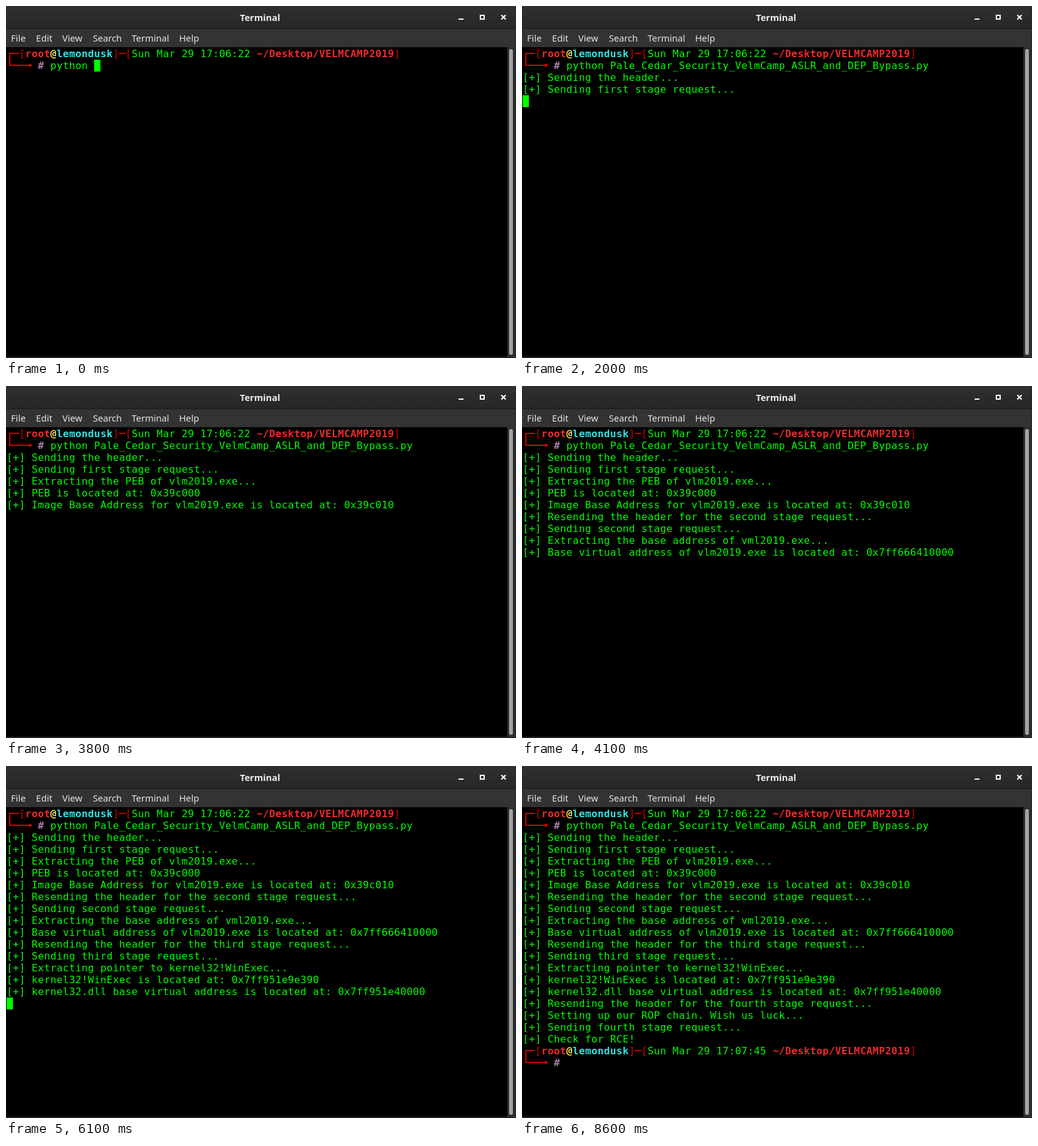
These frames come from a looping animation (816x564 px, 9 s). An HTML page:

```html
<!DOCTYPE html>
<html lang="en">
<head>
<meta charset="utf-8">
<title>Terminal</title>
<style>
  html, body { margin: 0; width: 100%; height: 100%; overflow: hidden; background: #000; }
  #stage { position: relative; width: 816px; height: 564px; overflow: hidden; background: #000; }
  #chrome { position: absolute; left: 0; top: 0; }
  #chrome text { font: 14.67px "Noto Sans", "Open Sans", sans-serif; fill: #e6e6e6; }
  #chrome .title { font-weight: bold; text-anchor: middle; fill: #eee; }
  #screen {
    position: absolute; left: 1px; top: 67px; width: 800px; height: 494px;
    font: 16px/19px "DejaVu Sans Mono", monospace;
    letter-spacing: calc(10px - 1ch); /* 10px character cells */
    font-variant-ligatures: none;
    white-space: pre; color: #0f0;
  }
  #screen > div { height: 19px; }
  #screen .prompt { position: relative; height: 38px; }
  .prompt svg { position: absolute; left: 0; top: 0; }
  .prompt b { font-weight: bold; }
  .red { color: #c00; }
  .user { color: #ef2929; }
  .at { color: #fce94f; }
  .host { color: #34e2e2; }
  .hash { color: #ad7fa8; }
  #cursor { position: absolute; width: 10px; background: #0f0; }
</style>
</head>
<body>
<div id="stage">
  <svg id="chrome" width="816" height="564" viewBox="0 0 816 564">
    <defs>
      <linearGradient id="bar" x2="0" y2="1">
        <stop offset="0" stop-color="#303030"/>
        <stop offset="1" stop-color="#262626"/>
      </linearGradient>
    </defs>
    <rect width="815" height="37" fill="url(#bar)"/>
    <rect y="36" width="815" height="1" fill="#1a1a1a"/>
    <rect y="37" width="815" height="29" fill="#333"/>
    <rect x="802" y="66" width="13" height="496" fill="#2e2e2e"/>
    <rect x="805" y="69" width="6" height="490" rx="3" fill="#a4a4a4"/>
    <rect x="815" width="1" height="564" fill="#20242c"/>
    <rect y="562" width="816" height="1" fill="#2b2b2b"/>
    <rect y="563" width="816" height="1" fill="#1c1522"/>
    <text class="title" x="406.5" y="24">Terminal</text>
    <text x="8" y="57">File</text>
    <text x="48" y="57">Edit</text>
    <text x="90" y="57">View</text>
    <text x="139" y="57">Search</text>
    <text x="201" y="57">Terminal</text>
    <text x="277" y="57">Help</text>
    <g fill="none" stroke="#fff" stroke-width="2">
      <path d="M724 21h8"/>
      <rect x="759" y="15" width="6" height="6"/>
      <path d="M792.5 14.5l7 7m0-7l-7 7" stroke-width="2.2"/>
    </g>
  </svg>
  <div id="screen"></div>
</div>
<script>
const LOOP = 9000, CELL = 10, ROW = 19;
const SCRIPT = "Pale_Cedar_Security_VelmCamp_ASLR_and_DEP_Bypass.py ";
const LOG = [
  "Sending the header...",
  "Sending first stage request...",
  "Extracting the PEB of vlm2019.exe...",
  "PEB is located at: 0x39c000",
  "Image Base Address for vlm2019.exe is located at: 0x39c010",
  "Resending the header for the second stage request...",
  "Sending second stage request...",
  "Extracting the base address of vml2019.exe...",
  "Base virtual address of vlm2019.exe is located at: 0x7ff666410000",
  "Resending the header for the third stage request...",
  "Sending third stage request...",
  "Extracting pointer to kernel32!WinExec...",
  "kernel32!WinExec is located at: 0x7ff951e9e390",
  "kernel32.dll base virtual address is located at: 0x7ff951e40000",
  "Resending the header for the fourth stage request...",
  "Setting up our ROP chain. Wish us luck...",
  "Sending fourth stage request...",
  "Check for RCE!"
];

// [start ms, value] steps
const TYPED = [[0, 0], [100, 1], [400, 2], [700, 4], [1200, SCRIPT.length]];
const LINES = [[0, 0], [2000, 2], [2500, 5], [4100, 9], [6100, 14], [8100, LOG.length]];
const BLINK = [[0, 1], [1700, 0], [2000, 1], [2600, 0], [3200, 1], [3800, 0], [4400, 1],
  [5000, 0], [5600, 1], [6200, 0], [6800, 1], [7400, 0], [8000, 1], [8600, 0]];

const at = (steps, t) => steps.reduce((v, [start, next]) => t >= start ? next : v, 0);

const prompt = (time, command) => `<div class="prompt">` +
  `<svg width="200" height="38" fill="none" stroke="#c00" stroke-width="2">` +
  `<path d="M20 9H5V28H40M180 9h10"/><path d="M35 28h5" stroke-width="4"/></svg>` +
  `<span class="red">  [</span><b class="user">root</b><b class="at">@</b>` +
  `<b class="host">lemondusk</b><span class="red">] [</span>Sun Mar 29 ${time} ` +
  `<b class="user">~/Desktop/VELMCAMP2019</b><span class="red">]</span>\n` +
  `     <b class="hash">#</b> ${command}</div>`;

const screen = document.getElementById("screen");
screen.innerHTML = prompt("17:06:22", `python <span id="typed"></span>`) +
  LOG.map(line => `<div class="log">[+] ${line}</div>`).join("") +
  prompt("17:07:45", "") + `<i id="cursor" style="height:${ROW}px"></i>`;

const typed = document.getElementById("typed");
const cursor = document.getElementById("cursor");
const logs = [...screen.querySelectorAll(".log")];
const lastPrompt = screen.querySelectorAll(".prompt")[1];
const show = (el, on) => { el.style.visibility = on ? "visible" : "hidden"; };

function draw(t) {
  const chars = at(TYPED, t), lines = at(LINES, t), done = lines === LOG.length;
  typed.textContent = SCRIPT.slice(0, chars);
  logs.forEach((el, i) => show(el, i < lines));
  show(lastPrompt, done);
  const row = done ? lines + 3 : lines ? lines + 2 : 1;
  const col = done ? 7 : lines ? 0 : 14 + chars;
  cursor.style.left = col * CELL + "px";
  cursor.style.top = row * ROW + "px";
  show(cursor, at(BLINK, t));
}

const start = performance.now();
function tick() {
  draw((performance.now() - start) % LOOP);
  requestAnimationFrame(tick);
}
tick();
</script>
</body>
</html>
```
